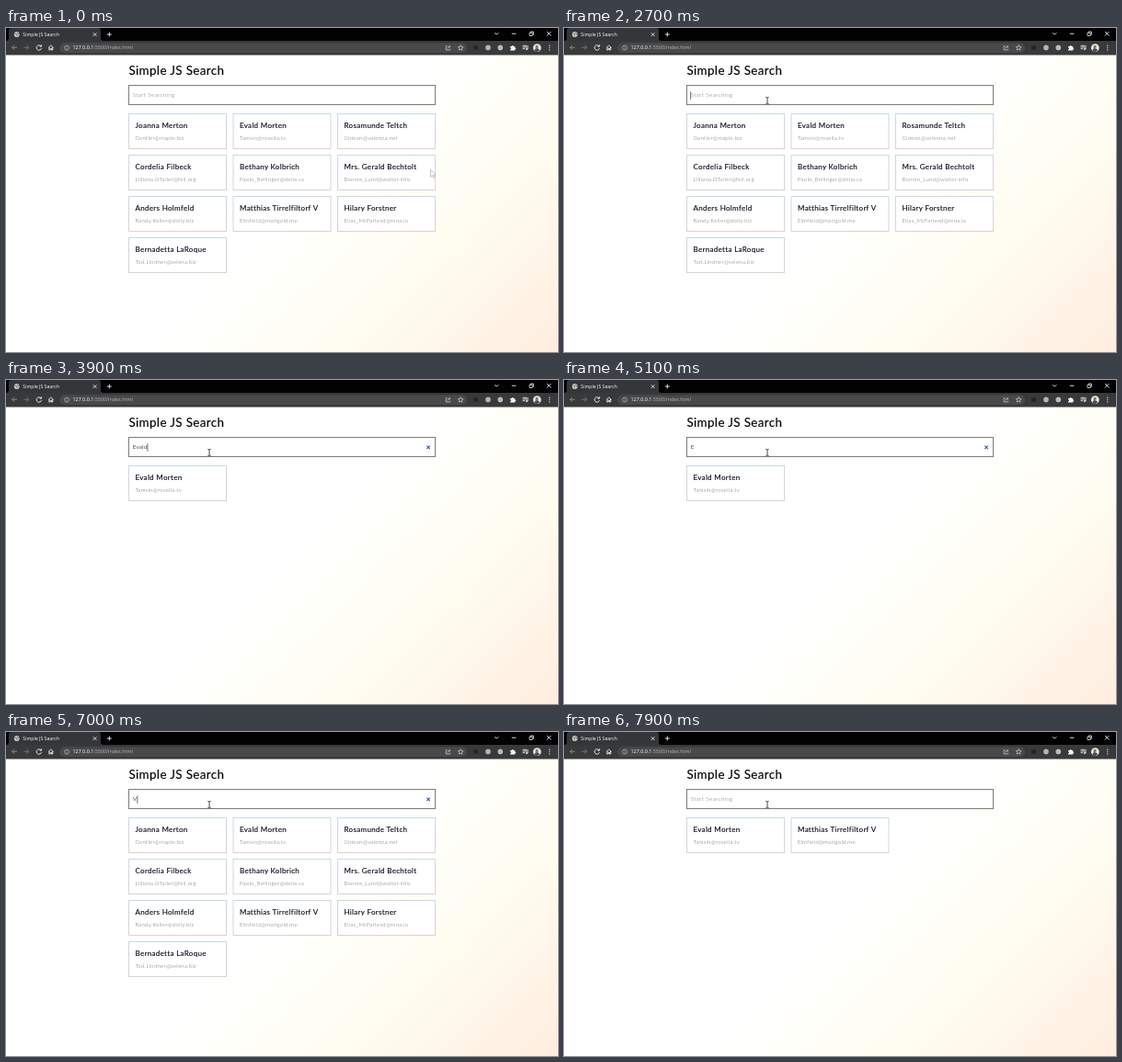
An HTML page for the animation above (8 s loop, 600 by 353 pixels).

```html
<!DOCTYPE html>
<html lang="en">
<head>
<meta charset="utf-8">
<title>Simple JS Search</title>
<style>
  html, body { margin: 0; width: 100%; height: 100%; overflow: hidden; background: #fff; }
  svg { display: block; width: 600px; height: 353px; }
  text { font-family: Lato, "Open Sans", sans-serif; white-space: pre; }
  .ui { font: 5.2px "Open Sans", "Noto Sans", sans-serif; }
  .title { font-size: 13.4px; letter-spacing: .38px; fill: #000; stroke: #000; stroke-width: .15; }
  .name { font-size: 8px; letter-spacing: .32px; fill: #06061a; stroke: #06061a; stroke-width: .12; }
  .mail { font-size: 5.9px; font-weight: 300; letter-spacing: .33px; fill: #66666f; }
  .hint { font-size: 6.4px; font-weight: 300; letter-spacing: .3px; fill: #707070; }
  .typed { font-size: 6.4px; letter-spacing: .1px; fill: #50505a; }
  .icon { fill: none; stroke: #d6d7da; stroke-width: .9; }
</style>
</head>
<body>
<svg viewBox="0 0 600 353">
  <defs>
    <linearGradient id="page" gradientUnits="userSpaceOnUse" x1="69" y1="-40" x2="531" y2="422">
      <stop offset=".5" stop-color="#fff"/>
      <stop offset=".74" stop-color="#fffdf1"/>
      <stop offset="1" stop-color="#ffeddf"/>
    </linearGradient>
    <linearGradient id="edge" x1="0" y1="0" x2="0" y2="1">
      <stop offset="0" stop-color="#c6dbe3"/>
      <stop offset=".5" stop-color="#d5d3dc"/>
      <stop offset="1" stop-color="#dcd2cf"/>
    </linearGradient>
  </defs>

  <rect width="600" height="353" fill="#fff"/>
  <rect y="29" width="600" height="324" fill="url(#page)"/>

  <!-- browser frame -->
  <rect width="600" height="14" fill="#020202"/>
  <path d="M0 14q3 0 3-3V3q0-3 3-3h94q3 0 3 3v8q0 3 3 3z" fill="#35363a"/>
  <rect y="14" width="600" height="15.5" fill="#38393b"/>
  <rect x="58" y="16.3" width="443" height="10.8" rx="5.4" fill="#48494b"/>
  <circle cx="11.7" cy="7" r="2.9" fill="#c9cbce"/>
  <path d="M9.5 6l2 .8.3 2M12 4.8l1 1.6 1.2.3" class="icon" style="stroke:#55575c;stroke-width:.8"/>
  <text class="ui" x="18.3" y="8.9" fill="#fff">Simple JS Search</text>
  <text class="ui" x="72.5" y="23.4" fill="#fff" style="font-size:5.4px">127.0.0.1<tspan fill="#b4b6b9">:5500/index.html</tspan></text>
  <g class="icon">
    <path d="M94.8 5.3l3.6 3.6m0-3.6l-3.6 3.6M109.8 7h5m-2.5-2.5v5" stroke="#f0f0f0"/>
    <path d="M531.3 5.2l2 2 2-2M549.8 6.2h4.6M588 4l4.4 4.4m0-4.4L588 8.4" stroke="#eee"/>
    <path d="M569 5.2h3.2v3.2H569zM570.2 5V4h3.2v3.2h-1" stroke="#eee" stroke-width=".8"/>
    <path d="M12 21.3H6.6M9.2 18.7l-2.6 2.6 2.6 2.6" stroke="#8e9093"/>
    <path d="M19.4 21.3h5.4m-2.6-2.6l2.6 2.6-2.6 2.6" stroke="#75777b"/>
    <path d="M38 19.8a2.7 2.7 0 1 0 .5 2.3M38.6 18.2v2h-2" stroke="#f0f0f0"/>
    <path d="M46 21.6l2.8-2.7 2.8 2.7M46.9 21v3h1.2v-1.8h1.4V24h1.2v-3" stroke="#f0f0f0"/>
    <circle cx="66" cy="21.6" r="2.5" stroke="#b9bbbe" stroke-width=".7"/>
    <path d="M66 21.3v1.6m0-2.8v.6" stroke="#b9bbbe" stroke-width=".7"/>
    <path d="M479.5 19.6h-1.3v4.3h4.6v-1.2M479.8 22.4q.2-2.2 3-2.2m-1.2-1.3l1.4 1.3-1.4 1.3" stroke-width=".7"/>
    <path d="M494.2 18.6l.8 1.9 2.1.2-1.6 1.4.5 2-1.8-1.1-1.8 1.1.5-2-1.6-1.4 2.1-.2z" stroke-width=".7"/>
    <path d="M561.6 19.3h4.6m-4.6 1.7h4.6m-4.6 1.7h2.4M567 19v4" stroke="#eee"/>
    <circle cx="566" cy="23" r=".8" fill="#eee"/>
  </g>
  <rect x="508.3" y="19.2" width="4.4" height="4.4" fill="#232426"/>
  <circle cx="524" cy="21.4" r="2.8" fill="#b4b6b8"/>
  <circle cx="537.3" cy="21.4" r="2.8" fill="#b9bbbe"/>
  <path d="M548 20h1.6a1.1 1.1 0 0 1 2.2 0h1.4v1.5a1 1 0 0 1 0 2v1H548v-1.3a1 1 0 0 0 0-2z" fill="#f1f1f1"/>
  <circle cx="577.3" cy="21.6" r="4.4" fill="#e9e9dc"/>
  <path d="M574.2 24.7q.4-2.6 2.8-2.6t3 2.5a4.4 4.4 0 0 1-5.8.1z" fill="#4a4d3c"/>
  <circle cx="577" cy="20.4" r="1.6" fill="#77745f"/>
  <g fill="#e4e5e7"><circle cx="590.8" cy="19.3" r=".7"/><circle cx="590.8" cy="21.6" r=".7"/><circle cx="590.8" cy="23.9" r=".7"/></g>

  <!-- search page -->
  <text class="title" x="133.4" y="50.8">Simple JS Search</text>
  <rect x="133.5" y="62.5" width="333" height="21" fill="#fff" stroke="#7d7b72"/>
  <text id="hint" class="hint" x="137.8" y="75.4">Start Searching</text>
  <text id="typed" class="typed" x="137.8" y="75.4"></text>
  <path id="caret" d="M0 69.2v8.6" stroke="#333" stroke-width=".7"/>
  <path id="clear" d="M457.3 71.6l3.6 3.6m0-3.6l-3.6 3.6" stroke="#3a5c9e" stroke-width="1.1"/>
  <g id="cards"></g>
  <path id="arrow" d="M0 0v7.8l1.9-1.6 1.2 2.7 1.2-.6-1.2-2.5 2.5-.2z" fill="#fff" stroke="#9c9ca1" stroke-width=".6"/>
  <path id="beam" d="M-1.7-3.6Q0-3.6 0-2.8 0-3.6 1.7-3.6M0-3V3M-1.7 3.6Q0 3.6 0 2.8 0 3.6 1.7 3.6" fill="none" stroke="#222" stroke-width=".8"/>
</svg>
<script>
const LOOP = 8000;
const $ = id => document.getElementById(id);

const people = [
  ["Joanna Merton", "Gentler@maple.biz"],
  ["Evald Morten", "Tamsin@rosella.tv"],
  ["Rosamunde Teltch", "Gideon@solenna.net"],
  ["Cordelia Filbeck", "Lilliana.OTaller@fell.org"],
  ["Bethany Kolbrich", "Paolo_Bellinger@delia.ca"],
  ["Mrs. Gerald Bechtolt", "Bonnie_Lund@walter.info"],
  ["Anders Holmfeld", "Randy.Keller@dolly.biz"],
  ["Matthias Tirrelfiltorf V", "Elmfield@marigold.me"],
  ["Hilary Forstner", "Elias_McFarland@rena.io"],
  ["Bernadetta LaRoque", "Tod.Lindner@selena.biz"]
];

// [time, value] steps; each value holds until the next
const typing = [[0, ""], [2800, "E"], [3100, "Ev"], [3300, "Eva"], [3400, "Eval"], [3700, "Evald"],
  [4800, "Eval"], [4900, "Ev"], [5000, "E"], [5500, ""], [7000, "V"], [7900, ""]];
const queries = [[0, ""], [3900, "evald"], [5400, ""], [7400, "v"]];
const blinks = [[0, 0], [2300, 1], [4400, 0], [4600, 1], [5100, 0], [5900, 1], [6400, 0], [6800, 1], [7400, 0]];
// pointer path: time, x, y
const path = [[600, 461.5, 154.5], [700, 452, 155], [800, 421, 157], [900, 374, 159], [1000, 318, 160],
  [1100, 262, 158], [1200, 224, 152], [1300, 210, 142], [1400, 207, 120], [1500, 206.6, 98],
  [1600, 209, 90], [1700, 214, 84], [1800, 219, 80], [1900, 221, 79]];

const at = (steps, t) => steps.filter(s => s[0] <= t).pop()[1];
const show = (el, on) => el.setAttribute("visibility", on ? "visible" : "hidden");

function pointer(t) {
  const i = path.findIndex(p => p[0] > t);
  if (i === 0) return path[0].slice(1);
  if (i < 0) return path[path.length - 1].slice(1);
  const a = path[i - 1], b = path[i], k = (t - a[0]) / (b[0] - a[0]);
  return [a[1] + (b[1] - a[1]) * k, a[2] + (b[2] - a[2]) * k];
}

$("cards").innerHTML = people.map(([name, mail]) =>
  `<g><rect width="106" height="38" fill="#fff" stroke="url(#edge)"/>
   <text class="name" x="7" y="15.8">${name}</text><text class="mail" x="7" y="28.9">${mail}</text></g>`).join("");
const cards = [...$("cards").children];

function layout(query) {
  let n = 0;
  cards.forEach((card, i) => {
    const hit = people[i][0].toLowerCase().includes(query);
    card.setAttribute("display", hit ? "inline" : "none");
    if (!hit) return;
    card.setAttribute("transform", `translate(${133.5 + n % 3 * 113.5} ${93.5 + Math.floor(n / 3) * 45})`);
    n++;
  });
}

function draw(t) {
  const text = at(typing, t);
  $("typed").textContent = text;
  show($("hint"), !text);
  show($("clear"), text);
  show($("caret"), at(blinks, t));
  const end = text ? 138.4 + $("typed").getComputedTextLength() : 137.6;
  $("caret").setAttribute("transform", `translate(${end} 0)`);
  layout(at(queries, t));

  const [x, y] = pointer(t), over = t >= 1700;
  show($("arrow"), !over);
  show($("beam"), over);
  $(over ? "beam" : "arrow").setAttribute("transform", `translate(${x} ${y})`);
}

function tick() {
  draw(performance.now() % LOOP);
  requestAnimationFrame(tick);
}
tick();
</script>
</body>
</html>
```
